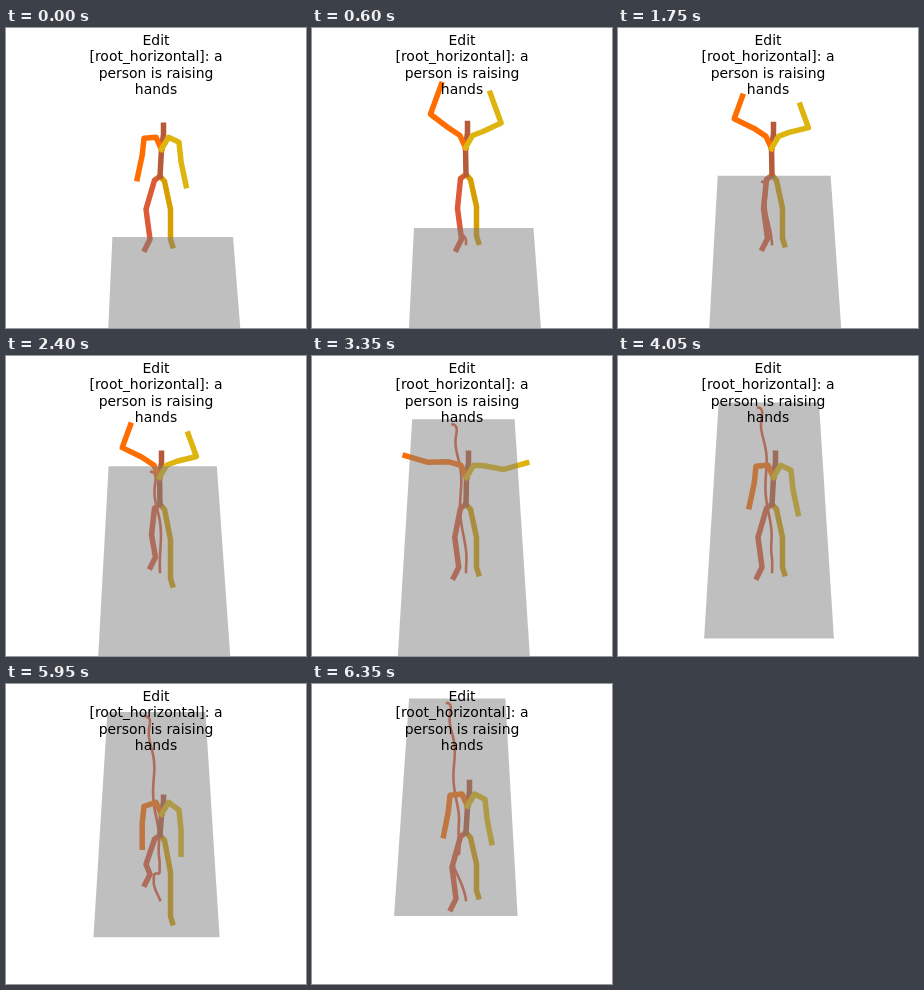
An HTML page for the animation above (6.4 s loop, 300 by 300 pixels).

```html
<!DOCTYPE html>
<html lang="en">
<head>
<meta charset="utf-8">
<title>Raising hands</title>
<style>
  html, body { margin: 0; width: 100%; height: 100%; overflow: hidden; background: #fff; }
  svg { display: block; width: 100vw; height: 100vh; }
  path { fill: none; stroke-width: 5.5; stroke-linecap: square; stroke-linejoin: round; }
  #trail { stroke: #dd5a37; stroke-width: 2.6; }
  #floor { fill: #808080; fill-opacity: .5; stroke: none; }
  text { font: 13.95px "DejaVu Sans", Verdana, sans-serif; text-anchor: middle; }
</style>
</head>
<body>
<svg viewBox="0 0 300 300">
  <path id="trail"/>
  <path id="legR" stroke="#dd5a37"/>
  <path id="legL" stroke="#d69e00"/>
  <path id="spine" stroke="#b75a39"/>
  <path id="armR" stroke="#ff6d00"/>
  <path id="armL" stroke="#ddb50e"/>
  <path id="floor"/>
  <text x="150" y="17">Edit</text>
  <text x="150" y="33.2">[root_horizontal]: a</text>
  <text x="150" y="49.6">person is raising</text>
  <text x="150" y="66">hands</text>
</svg>
<script>
const LOOP = 6400, STEP = 50, TAU = 2 * Math.PI;

// Body proportions as seen by the camera; x grows towards each side.
const RIGHT = {
  dir: -1, collar: 5.5, shoulder: 11, upper: 17, stretch: 5, raise: 116,
  hip: [5.5, 4], knee: 14, narrow: 5.5, shin: -4, reach: 4, toe: [5, 10]
};
const LEFT = {
  dir: 1, collar: 7, shoulder: 7, upper: 20, stretch: 0, raise: 104,
  hip: [4.5, 5], knee: 10.5, narrow: 0, shin: 0, reach: 14, toe: [2, 6.5]
};

// Smooth step from 0 at time a to 1 at time b.
function ramp(t, a, b) {
  const u = Math.min(1, Math.max(0, (t - a) / (b - a)));
  return u * u * (3 - 2 * u);
}
const pulse = (t, mid, width) => Math.exp(-(((t - mid) / width) ** 2));

// Floor perspective: its width grows linearly down the screen.
const widthAt = y => 132 + (y - 300) * .125;
const yAt = w => 300 + (w - 132) / .125;
const FOOT_X = .033, FOOT_DEPTH = 1 / widthAt(216);

// Far edge of the floor: one long walk, a pause, then setting off again.
function farEdge(t) {
  const restart = Math.max(0, (t - 4700) / 1650);
  return 209 - 163 * ramp(t, 0, 4200) - 31.5 * restart ** 2;
}

// Sideways place of the floor, in floor widths.
function sideways(t) {
  const drift = .13 - .124 * Math.min(1, t / 3600);
  const sway = .015 * Math.cos(TAU * (t - 1100) / 1300) * (1 - ramp(t, 3000, 3600));
  return drift + sway + .05 * ramp(t, 3900, 5200) - .112 * ramp(t, 5450, 6500);
}

// Positive while the right foot is lifted, negative for the left.
function stride(t) {
  const walk = .8 * ramp(t, 0, 900) * (1 - ramp(t, 2000, 3300));
  const restart = ramp(t, 5450, 5950) * Math.cos((t - 5950) / 400 * 2);
  return walk * Math.sin(TAU * (t - 1750) / 2600) + restart;
}

const track = Array.from({ length: LOOP / STEP }, (_, i) => {
  const top = farEdge(i * STEP);
  return { top, side: sideways(i * STEP), depth: 1 / widthAt(top) };
});

const add = ([x, y], dx, dy) => [x + dx, y + dy];
const line = pts => "M" + pts.map(p => p.map(v => v.toFixed(2)).join(" ")).join("L");
const set = (id, d) => document.getElementById(id).setAttribute("d", d);

function floorPath(n) {
  const { top, side } = track[n];
  const bottom = 280 + 1.57 * (top - 45);
  const corner = (y, s) => [150 + (side + s) * widthAt(y), y];
  return line([corner(top, -.5), corner(top, .5), corner(bottom, .5), corner(bottom, -.5)]) + "Z";
}

// Past places of the body, seen from where it is now.
function trailPath(n) {
  const { side, depth } = track[n];
  return n ? line(track.slice(0, n + 1).map(past => {
    const w = 1 / (depth + FOOT_DEPTH - past.depth);
    return [150 + (side + FOOT_X - past.side) * w, yAt(w)];
  })) : "";
}

function armPath(b, chest, { lift, fling, stoop }) {
  const out = 1 - (1 - lift) ** 2;
  const swing = (from, degrees, length) => {
    const a = degrees * TAU / 360;
    return add(from, b.dir * length * Math.sin(a), length * Math.cos(a));
  };
  const collar = add(chest, b.dir * b.collar, -12);
  const shoulder = add(chest, b.dir * 17.5, -b.shoulder - 9 * lift + 3 * stoop);
  const elbow = swing(shoulder, 6 + (b.raise - 6) * out + 20 * fling, b.upper + b.stretch * out);
  const hand = swing(elbow, 12 + 188 * lift - 12 * stoop, 24 + 14 * fling);
  return line([chest, collar, shoulder, elbow, hand]);
}

function legPath(b, root, raised, { lift }) {
  const hip = add(root, b.dir * b.hip[0], b.hip[1]);
  const knee = add(root, b.dir * (b.knee - b.narrow * lift), 33 - 4 * raised);
  const shin = raised > 0 ? 30 - 20 * raised ** 2 : 30 - b.reach * raised;
  const ankle = add(knee, b.dir * b.shin, shin);
  return line([root, hip, knee, ankle, add(ankle, b.dir * b.toe[0], b.toe[1])]);
}

function draw(n) {
  const t = n * STEP;
  const pose = {
    lift: ramp(t, 0, 600) * (1 - ramp(t, 2900, 3800)),
    fling: pulse(t, 500, 130),
    stoop: pulse(t, 5950, 250)
  };
  const { lift, stoop } = pose, step = stride(t);
  const root = [154, 148.3 - 4.8 * pulse(t, 1100, 500) + 3 * stoop];
  const chest = add(root, 1.5 - 2 * lift, -27 + 6 * stoop);
  const neck = add(chest, 2, -15 + 3 * stoop);

  set("trail", trailPath(n));
  set("legR", legPath(RIGHT, root, step, pose));
  set("legL", legPath(LEFT, root, -step, pose));
  set("spine", line([root, chest, neck, add(neck, 0, -9 + 4 * stoop)]));
  set("armR", armPath(RIGHT, chest, pose));
  set("armL", armPath(LEFT, chest, pose));
  set("floor", floorPath(n));
}

const start = performance.now();
function tick() {
  draw(Math.floor((performance.now() - start) % LOOP / STEP));
  requestAnimationFrame(tick);
}
tick();
</script>
</body>
</html>
```
